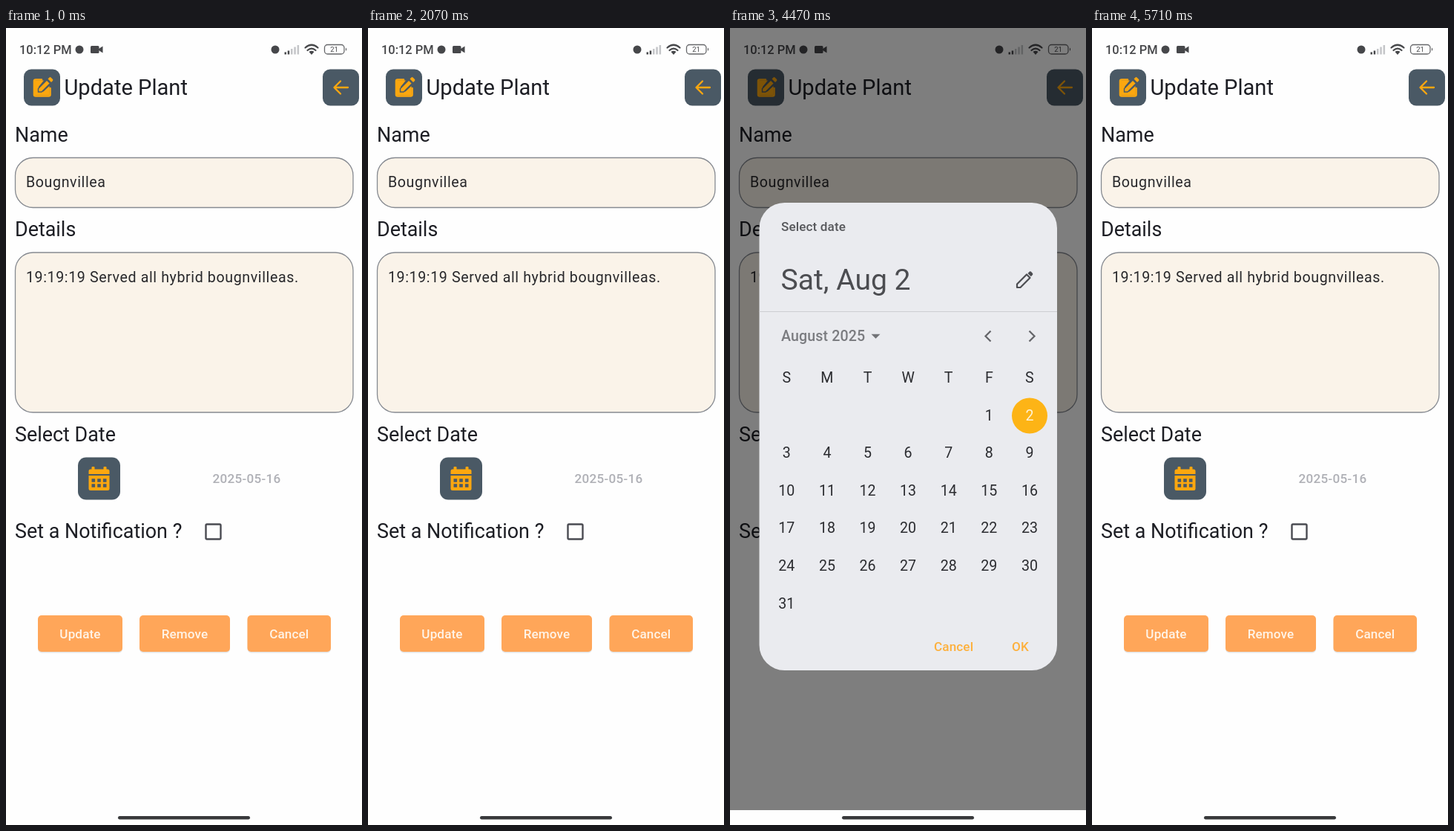
Recreate the animation shown at these times as an HTML page. Size 480 by 1072 pixels, loop 5.79 s.

```html
<!DOCTYPE html>
<html lang="en">
<head>
<meta charset="utf-8">
<title>Update Plant</title>
<style>
html, body { margin: 0; width: 100%; height: 100%; overflow: hidden; background: #fefefe; }
svg { display: block; width: 100%; height: 100%; }
text { font-family: Roboto, sans-serif; white-space: pre; }
.label { font-size: 26.9px; fill: #1d1e24; }
.input { font-size: 19.6px; letter-spacing: .61px; fill: #28282b; }
.small { font-size: 17.1px; font-weight: 500; letter-spacing: .12px; }
.mid { text-anchor: middle; }
.field { fill: #faf3e9; stroke: #868a91; stroke-width: 1.3; }
.day { font-size: 19.6px; fill: #2b2c30; text-anchor: middle; }
.line { fill: none; stroke-linecap: round; stroke-linejoin: round; }
</style>
</head>
<body>
<svg viewBox="0 0 480 1072">
  <defs>
    <g id="calendar">
      <rect width="57" height="57" rx="11" fill="#4a5965"/>
      <g fill="#fca70f">
        <rect x="18.5" y="12.5" width="4" height="7" rx="1"/>
        <rect x="34.5" y="12.5" width="4" height="7" rx="1"/>
        <path d="M17 16H40Q42.500 16 42.500 18.500V22.500H14.500V18.500Q14.500 16 17 16Z"/>
        <path d="M14.500 24.500H42.500V42Q42.500 44.500 40 44.500H17Q14.500 44.500 14.500 42Z"/>
      </g>
      <path d="M18.500 31H38.500M18.500 38H38.500" stroke="#4a5965" stroke-width="4.500" stroke-dasharray="4.600 3.100"/>
    </g>
  </defs>

  <rect width="480" height="1072" fill="#fefefe"/>

  <g id="status" fill="#46474a">
    <text x="18" y="35" font-size="16.4" font-weight="500">10:12 PM</text>
    <circle cx="99" cy="29" r="5.500"/>
    <rect x="114" y="24" width="11.500" height="10" rx="1.500"/>
    <path d="M125 28L130.500 24.500V33.500L125 30Z"/>
    <circle cx="363" cy="29" r="5.500"/>
    <path d="M375.500 32.500h2.500v3h-2.500zM379.700 30.500h2.500v5h-2.500z"/>
    <path d="M384 28h2.500v7.500h-2.500zM388.300 25.500h2.500v10h-2.500zM392.600 23h2.500v12.500h-2.500z" fill="#c4c5c8"/>
    <g class="line" stroke="#46474a" stroke-width="2.200">
      <path d="M403.500 26.500Q412 19 420.500 26.500M406.500 30Q412 25.200 417.500 30"/>
    </g>
    <path d="M408.500 32Q412 29.300 415.500 32L412 36Z"/>
    <rect x="429.500" y="22.500" width="26.500" height="12.500" rx="4" fill="none" stroke="#66676a" stroke-width="1.300"/>
    <path d="M458 26.500q2.300 2.200 0 4.500z"/>
    <text class="mid" x="442.500" y="32.300" font-size="9.500">21</text>
  </g>

  <rect x="24" y="55.500" width="49" height="49" rx="10" fill="#4a5965"/>
  <path class="line" d="M48 69.500H40Q38 69.500 38 71.500V89.500Q38 91.500 40 91.500H57.500Q59.500 91.500 59.500 89.500V81" stroke="#fca70f" stroke-width="2.600"/>
  <path d="M39 70.500H51L44 79V85.500H50.500L58.500 78V90.500H39Z" fill="#fca70f"/>
  <path d="M43.500 86V81.500L55 70L59.500 74.500L48 86Z" fill="#fca70f" stroke="#4a5965" stroke-width="1.400"/>
  <path d="M56.500 68.500L58.500 66.500Q59.500 65.700 60.500 66.500L63 69Q63.800 70 63 71L61 73Z" fill="#fca70f"/>
  <text x="78.500" y="89.500" font-size="29.100" fill="#1d1e24">Update Plant</text>
  <rect x="427" y="55.500" width="49" height="49" rx="10" fill="#4a5965"/>
  <path class="line" d="M461 80H443M451 71.500L442.500 80L451 88.500" stroke="#fca70f" stroke-width="2.300"/>

  <text class="label" x="12" y="152.500">Name</text>
  <rect class="field" x="12.500" y="174.500" width="455.500" height="67" rx="24"/>
  <text class="input" x="27" y="214">Bougnvillea</text>
  <text class="label" x="12" y="280">Details</text>
  <rect class="field" x="12.500" y="302" width="455.500" height="215" rx="24"/>
  <text class="input" x="27" y="342">19:19:19 Served all hybrid bougnvilleas.</text>
  <text class="label" x="12" y="555.500">Select Date</text>
  <use href="#calendar" x="97" y="577.500"/>
  <text class="small" x="278.500" y="612.300" fill="#afb0b6" style="letter-spacing:.3px">2025-05-16</text>
  <text class="label" x="12" y="686">Set a Notification ?</text>

  <rect x="269.500" y="667.500" width="20" height="20" rx="1.500" fill="none" stroke="#4a4b52" stroke-width="2.400"/>
  <g id="checked">
    <rect x="268" y="666" width="23" height="23" rx="2.500" fill="#feb021"/>
    <path id="tick" d="M272.500 677.500L277.300 682.300L287 672.500" fill="none" stroke="#fff8ea" stroke-width="2.400" pathLength="1" stroke-dasharray="1 2"/>
  </g>
  <use id="alarm" href="#calendar" x="111" y="720"/>
  <g id="buttons"></g>

  <g id="barrier"><rect width="480" height="1052" fill="#000" fill-opacity=".5"/></g>
  <g id="dialog">
    <rect x="39.500" y="235" width="401.500" height="629" rx="34" fill="#eaebef"/>
    <text class="small" x="69" y="272.500" fill="#56575b">Select date</text>
    <text x="68.500" y="351.500" font-size="39.100" fill="#4c4d51">Sat, Aug 2</text>
    <path class="line" d="M387 349V344.500L400 331.500L404.500 336L391.500 349Z" stroke="#4c4d51" stroke-width="2.200"/>
    <path d="M401.500 330L404 327.500Q405 327 406 327.800L408 330Q408.700 331 408 332L405.800 334.300Z" fill="#4c4d51"/>
    <path d="M39.500 381.500H441" stroke="#cdced2" stroke-width="1.200"/>
    <text x="69" y="421" font-size="19.600" font-weight="500" letter-spacing=".12" fill="#7b7c80">August 2025</text>
    <path d="M190.500 411.700H202.500L196.500 417.700Z" fill="#727377"/>
    <path d="M351.500 407.500L344.500 414.500L351.500 421.500M403.500 407.500L410.500 414.500L403.500 421.500" fill="none" stroke="#65666a" stroke-width="2.300"/>
    <circle cx="404" cy="521.500" r="24" fill="#fdb416"/>
    <g id="days"></g>
    <g class="small" fill="#fdb03c">
      <text x="275" y="838">Cancel</text>
      <text x="380" y="838">OK</text>
    </g>
  </g>

  <rect x="151" y="1060" width="178" height="4.500" rx="2.200" fill="#38393b"/>
</svg>
<script>
const LOOP = 5790;
const CHECK = 110, UNCHECK = 1030, OPEN = 3490, CLOSE = 4550, FADE = 150;
const $ = id => document.getElementById(id);
const clamp = v => Math.min(1, Math.max(0, v));
const easeOut = v => 1 - (1 - v) ** 2;

$('buttons').innerHTML = [['Update', 43, 114], ['Remove', 180, 122], ['Cancel', 325.5, 112.5]]
  .map(([label, x, w]) => `
    <rect x="${x}" y="791.5" width="${w}" height="49" rx="5" fill="#000" opacity=".1"/>
    <rect x="${x}" y="790" width="${w}" height="49" rx="5" fill="#ffa659"/>
    <text class="small mid" x="${x + w / 2}" y="821" fill="#fff4e8">${label}</text>`).join('');

const cell = (label, col, row, color = '#2b2c30') =>
  `<text class="day" x="${76.3 + 54.6 * col}" y="${477 + 50.6 * row}" style="fill:${color}">${label}</text>`;
let days = [...'SMTWTFS'].map((d, i) => cell(d, i, 0)).join('');
for (let d = 1; d <= 31; d++) {
  const slot = d + 4;
  days += cell(d, slot % 7, 1 + Math.floor(slot / 7), d === 2 ? '#fff3d6' : undefined);
}
$('days').innerHTML = days;

// Progress that rises from one time and falls again from another.
const between = (t, on, off, length) =>
  t < off ? clamp((t - on) / length) : 1 - clamp((t - off) / length);

function draw(now) {
  const t = now % LOOP;
  const open = t >= CHECK && t < UNCHECK;
  $('alarm').style.display = open ? '' : 'none';
  $('buttons').setAttribute('transform', `translate(0 ${open ? 49 : 0})`);

  const check = between(t, CHECK, UNCHECK, 200);
  $('checked').setAttribute('opacity', clamp(check * 2));
  $('tick').setAttribute('stroke-dashoffset', 1 - clamp(check * 2 - 1));

  const fade = between(t, OPEN, CLOSE, FADE);
  $('barrier').setAttribute('opacity', easeOut(fade));
  $('dialog').setAttribute('opacity', easeOut(fade));
  requestAnimationFrame(draw);
}
draw(0);
</script>
</body>
</html>
```
